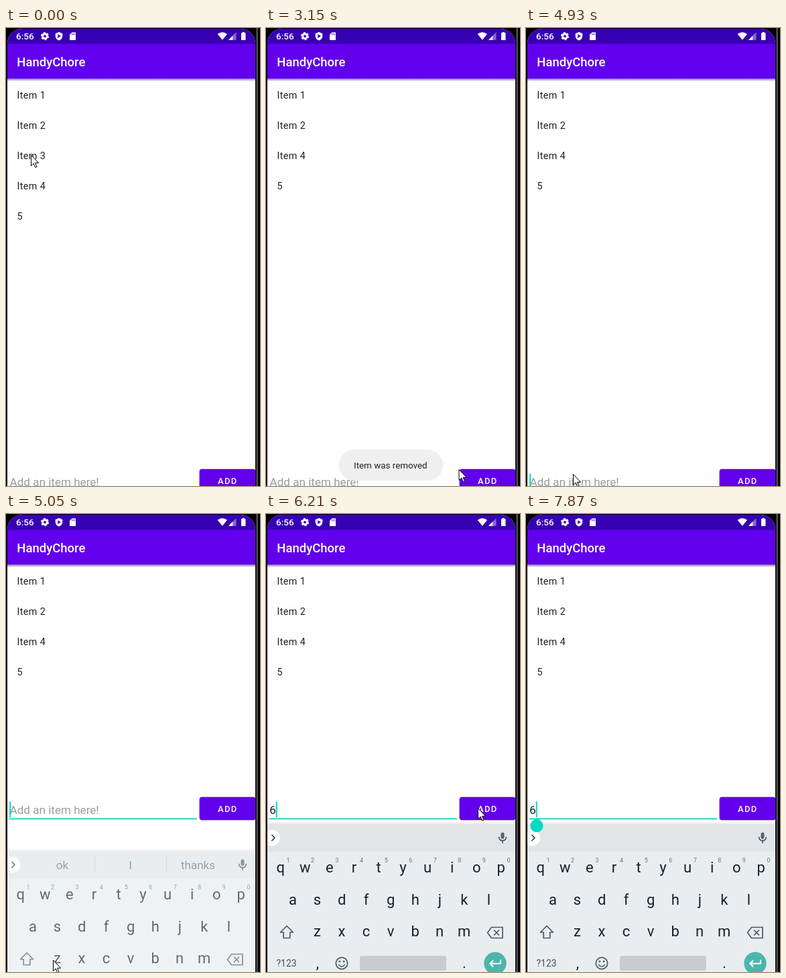
Animation, 379 px wide and 681 px high, one loop 7990 ms. Source, as an HTML page:

```html
<!DOCTYPE html>
<html lang="en">
<head>
<meta charset="utf-8">
<title>To-do list</title>
<style>
  html, body { margin: 0; width: 100%; height: 100%; overflow: hidden; background: #000; }
  svg { display: block; width: 100vw; height: 100vh; font-family: Roboto, Arial, sans-serif; }
  .items { font-size: 14.4px; letter-spacing: .36px; fill: #202020; }
  .mid { text-anchor: middle; }
  .keys { font-size: 22px; fill: #12232b; }
  .nums { font-size: 9px; fill: #66737a; }
  .words { font-size: 17px; fill: #66727a; }
  .line { fill: none; stroke: #4b5a62; stroke-width: 1.7; stroke-linejoin: round; stroke-linecap: round; }
  .teal { fill: #03dac5; }
</style>
</head>
<body>
<svg viewBox="0 0 379 681">
  <defs>
    <clipPath id="screen"><path d="M2 681V23A22 22 0 0 1 24 1H350A22 22 0 0 1 372 23V681Z"/></clipPath>
    <linearGradient id="shade" x2="0" y2="1">
      <stop stop-color="#000" stop-opacity=".42"/>
      <stop offset="1" stop-color="#000" stop-opacity="0"/>
    </linearGradient>
  </defs>
  <rect width="379" height="681"/>
  <path d="M374.7 0V681" stroke="#555" stroke-width="2.4"/>

  <g clip-path="url(#screen)">
    <rect width="379" height="681" fill="#fefefe"/>
    <rect y="75.5" width="379" height="4" fill="url(#shade)"/>
    <rect y="23" width="379" height="52.5" fill="#6200ee"/>
    <rect width="379" height="23.5" fill="#3700b3"/>

    <g fill="#fff">
      <text x="15" y="17" font-size="13.6" font-weight="500">6:56</text>
      <circle cx="58" cy="12.2" r="3.4" fill="none" stroke="#fff" stroke-width="3"/>
      <circle cx="58" cy="12.2" r="5.2" fill="none" stroke="#fff" stroke-width="1.8" stroke-dasharray="2.8 2.645"/>
      <path d="M79 6L84.3 8.2V12Q84.2 16.5 79 18.6Q73.8 16.5 73.7 12V8.2Z"/>
      <path d="M77.3 9.3V14.9L81.8 12.1Z" fill="#3700b3"/>
      <path d="M98.5 6.5H104V18H95V10Z"/>
      <path d="M98.5 8V10.5M100.5 8V10.5M102.4 8V10.5" stroke="#3700b3" stroke-width=".8"/>
      <path d="M315.7 9Q322.8 3.3 330 9L322.8 17.8Z"/>
      <path d="M343.5 6.3V17.8H332Z" opacity=".4"/>
      <path d="M338.3 11.5V17.8H332Z"/>
      <path d="M352.8 6H355.7V7.3H357.5V18H351V7.3H352.8Z"/>
      <text x="16.3" y="57" font-size="18.5" font-weight="500">HandyChore</text>
    </g>

    <g class="items">
      <text x="16.4" y="104.6">Item 1</text>
      <text x="16.4" y="149.8">Item 2</text>
      <text id="gone" x="16.4" y="195">Item 3</text>
      <g id="tail">
        <text x="16.4" y="240.2">Item 4</text>
        <text x="16.4" y="285.4">5</text>
      </g>
    </g>

    <g id="entry">
      <text id="hint" x="5.5" y="445.8" font-size="17.1" fill="#9c9c9c">Add an item here!</text>
      <text id="typed" x="5.3" y="445.8" font-size="17" fill="#202020">6</text>
      <rect class="teal" x="5" y="452.4" width="280" height="1.8"/>
      <rect id="caret" class="teal" y="427.5" width="2" height="23.5"/>
      <rect x="288.6" y="422.5" width="84" height="34" rx="4" opacity=".15"/>
      <rect x="288.6" y="420.8" width="84" height="34.2" rx="4" fill="#6200ee"/>
      <text x="315.9" y="443.3" font-size="13" font-weight="500" letter-spacing="1.4" fill="#fff">ADD</text>
    </g>

    <g id="board">
      <rect y="458.5" width="379" height="2.5" opacity=".06"/>
      <rect y="461" width="379" height="221" fill="#e9edf0"/>
      <rect y="461" width="379" height="41" fill="#e1e5e8"/>
      <g id="words" class="words mid">
        <text x="84" y="488">ok</text>
        <text x="185.5" y="488">I</text>
        <text x="286.5" y="488">thanks</text>
        <path d="M132.5 470V493M239.5 470V493" stroke="#c6cbcf"/>
      </g>
      <circle cx="9" cy="481.5" r="12" fill="#fff"/>
      <path class="line" d="M9 477.5L13 481.5L9 485.5" style="stroke:#26343b"/>
      <rect x="350.5" y="473.5" width="5" height="9.5" rx="2.5" fill="#55636b"/>
      <path class="line" d="M347.7 480.5Q348 485.7 353 485.7Q358 485.7 358.3 480.5M353 486V489"/>

      <g id="keys" class="keys mid"></g>
      <g id="nums" class="nums mid"></g>

      <path class="line" d="M31 612.5L40.5 622H35.8V630.5H26.2V622H21.5Z"/>
      <path class="line" d="M336.5 614.5H353V630.5H336.5L330.5 622.5ZM340.5 619L347.5 626M347.5 619L340.5 626"/>
      <text x="15.5" y="673.3" font-size="14" fill="#43525a">?123</text>
      <circle class="line" cx="113" cy="668" r="8.7"/>
      <path class="line" d="M108.8 670.5Q113 675.5 117.2 670.5"/>
      <g fill="#4b5a62"><circle cx="109.9" cy="665.3" r="1.4"/><circle cx="116.1" cy="665.3" r="1.4"/></g>
      <rect x="140" y="657" width="129" height="22" rx="3" fill="#c8cbd0"/>
      <circle cx="342" cy="668" r="16.7" fill="#4db6ac"/>
      <path class="line" d="M350 663.5V668.5H334.5M338.5 664.3L334.3 668.5L338.5 672.7" style="stroke:#fff;stroke-width:2"/>
    </g>

    <path id="grip" class="teal" d="M16 452L21.5 455.8A9.5 9.5 0 1 1 10.5 455.8Z"/>

    <g id="toast">
      <rect x="109" y="627" width="155" height="46" rx="23" fill="#efefef"/>
      <text x="131" y="655" font-size="13.4" fill="#222">Item was removed</text>
    </g>
  </g>

  <path id="mouse" d="M.5 .5V16.5L4.2 13L6.8 19L9 18L6.5 12.2H11.6Z" fill="#fff" stroke="#000" stroke-linejoin="round"/>
</svg>

<script>
const LOOP = 7990, PITCH = 45.2, DROP = 235;
const HOLD = 21, FOCUS = 40, TYPE = 47, TAP = 57, END = 62;
const $ = id => document.getElementById(id);

function label(group, x, y, text) {
  const el = document.createElementNS("http://www.w3.org/2000/svg", "text");
  el.setAttribute("x", x);
  el.setAttribute("y", y);
  el.textContent = text;
  $(group).append(el);
}
function row(group, chars, x, y) {
  [...chars].forEach((c, i) => label(group, x + i * 36.55, y, c));
}
row("keys", "qwertyuiop", 21.8, 533);
row("keys", "asdfghjkl", 40, 580.6);
row("keys", "zxcvbnm", 76.4, 628.3);
row("keys", ",", 77, 674.5);
row("keys", ".", 296, 674.5);
row("nums", "1234567890", 33, 518);

const linear = u => u, easeIn = u => u * u, easeOut = u => u * (2 - u);
const smooth = u => u * u * (3 - 2 * u);

// Pointer stops: tick, x, y and the easing used to get there.
const stops = [
  [1, 37, 188.5, linear], [22, 37, 188.5, linear], [26, 287.5, 656, smooth],
  [29, 319, 663, easeOut], [31, 319, 663, linear], [32, 219, 647, linear],
  [39, 70, 663, easeOut], [44, 70, 663, linear], [50, 316, 437, easeIn],
  [53, 316, 437, linear], [55, 124, 437, linear], [59, 92, 457, linear]
];

function pointer(n) {
  const i = stops.findIndex(s => s[0] > n);
  if (i < 1) return (i ? stops.at(-1) : stops[0]).slice(1, 3);
  const [a, ...from] = stops[i - 1], [b, x, y, ease] = stops[i];
  const u = ease((n - a) / (b - a));
  return [from[0] + (x - from[0]) * u, from[1] + (y - from[1]) * u];
}

function tickAt(t) {
  return Math.floor(t < 2983 ? t / 120 : 25 + (t - 2983) / 128.2);
}
function move(id, x, y) {
  $(id).setAttribute("transform", `translate(${x} ${y})`);
}
function fade(id, a) {
  $(id).setAttribute("opacity", Number(a));
}

function draw(t) {
  const n = tickAt(t);
  const ramp = (a, b) => Math.min(1, Math.max(0, (n - a) / (b - a)));
  const typed = n >= TYPE, rise = ramp(FOCUS - 1, FOCUS + 2);

  fade("gone", 1 - ramp(HOLD - 1, HOLD + 1));
  move("tail", 0, -PITCH * smooth(ramp(HOLD + .5, HOLD + 3)));
  fade("toast", ramp(HOLD - .2, HOLD + 3) - ramp(FOCUS - 4, FOCUS));

  move("entry", 0, n > FOCUS ? 0 : DROP);
  fade("board", n > FOCUS ? rise : 0);
  move("board", 0, 120 * (1 - rise));

  fade("typed", typed);
  fade("hint", !typed);
  fade("words", n <= TYPE);
  $("caret").setAttribute("x", typed ? 14.8 : 5.3);
  fade("caret", n >= FOCUS && (n - (typed ? TYPE : FOCUS)) % 8 < 4);
  fade("grip", ramp(TAP - 1, TAP + 1));

  fade("mouse", n < END);
  move("mouse", ...pointer(n));
}

const start = performance.now();
function run() {
  draw((performance.now() - start) % LOOP);
  requestAnimationFrame(run);
}
run();
</script>
</body>
</html>
```
